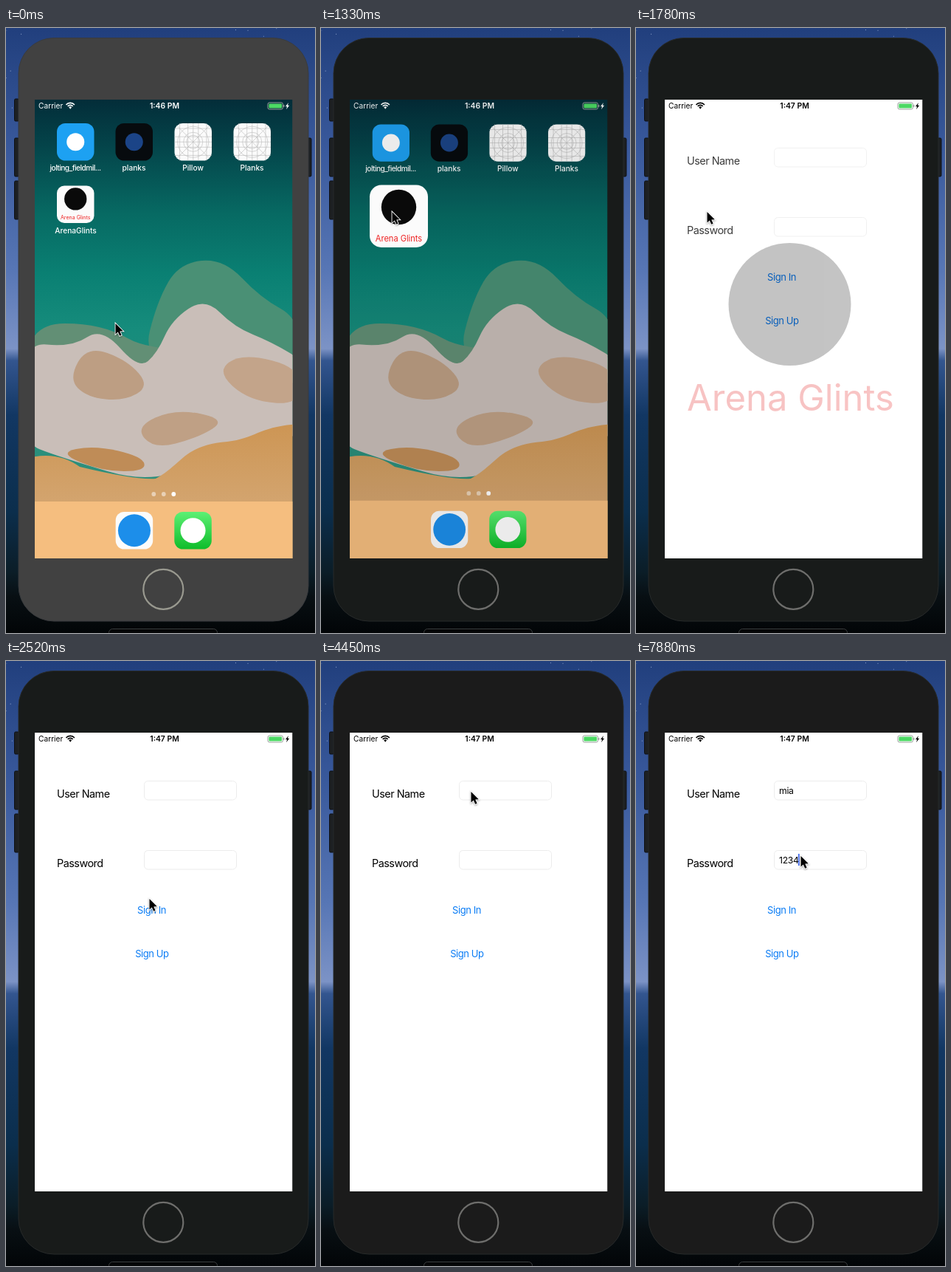
Animation, 419 px wide and 819 px high, one loop 8 s. Source, as an HTML page:

```html
<!DOCTYPE html>
<html lang="en">
<head>
<meta charset="utf-8">
<title>App launch and sign in</title>
<style>
html, body { margin: 0; width: 100%; height: 100%; overflow: hidden; background: #06101c; }
svg { display: block; width: 419px; height: 819px; font-family: Inter, "Open Sans", sans-serif; }
text { white-space: pre; }
#pointer { filter: drop-shadow(0 1px 1px rgba(0,0,0,.35)); }
</style>
</head>
<body>
<svg id="stage" viewBox="0 0 419 819"></svg>
<script>
const LOOP = 8000;
const TILE = 50.5;
const BLUE = '#0a7cf5';

// [time, x, y] of the pointer tip; each position is held until the next
const POINTER = [
  [0, 148, 400], [440, 128, 300], [590, 100, 197], [740, 92, 228], [890, 96, 249],
  [2220, 110, 256], [2370, 160, 290], [2520, 194, 322], [2670, 200, 338], [2810, 202, 354],
  [2960, 201, 378], [3110, 199, 396], [3250, 199, 402],
  [4000, 200, 370], [4150, 203, 290], [4300, 203, 205], [4450, 203, 177],
  [6090, 206, 190], [6240, 216, 224], [6390, 222, 254], [6530, 223, 262], [6680, 223, 264]
];
const USER_TEXT = [[0, ''], [5790, 'mia']];
const PASS_TEXT = [[0, ''], [7280, '12'], [7580, '123'], [7880, '1234']];
const USER_CARET = [[0, 0], [4750, 1], [5340, 0.45], [5490, 0], [5790, 1], [6680, 0]];
const PASS_CARET = [[0, 0], [6680, 1]];
const BODY = [[0, '#414141'], [1330, '#181b1a'], [2670, '#1b1b1b']];
const EDGE = [[0, '#393b3e'], [1330, '#272a2a']];
const RING = [[0, '#99998f'], [1330, '#6e6e6c']];
const HOME_SCALE = [[0, 1], [1330, 0.995], [1480, 0.95]];
const HOME_DIM = [[0, 0], [1330, 0.08], [1480, 0.59]];
const SPLASH = [[0, 0], [1630, 1], [1780, 0.23], [1920, 0]];

function held(keys, t) {
  let found = keys[0];
  for (const key of keys) if (key[0] <= t) found = key;
  return found;
}
const valueAt = (keys, t) => held(keys, t)[1];

// Markup helpers
const rect = (x, y, w, h, r, fill, extra = '') =>
  `<rect x="${x}" y="${y}" width="${w}" height="${h}" rx="${r}" fill="${fill}" ${extra}/>`;
const disc = (x, y, r, fill, extra = '') => `<circle cx="${x}" cy="${y}" r="${r}" fill="${fill}" ${extra}/>`;
const path = (d, fill, extra = '') => `<path d="${d}" fill="${fill}" ${extra}/>`;
const group = (id, body, extra = '') => `<g id="${id}" ${extra}>${body}</g>`;
const screenFill = (fill, extra) => rect(39, 97, 349.5, 621, 0, fill, extra);

function label(str, x, y, size, fill, { weight = 400, anchor = 'start', gap = 0 } = {}) {
  return `<text x="${x}" y="${y}" font-size="${size}" fill="${fill}" font-weight="${weight}" ` +
    `text-anchor="${anchor}" letter-spacing="${gap}">${str}</text>`;
}

function gradient(id, y1, y2, stops) {
  return `<linearGradient id="${id}" gradientUnits="userSpaceOnUse" x1="0" x2="0" y1="${y1}" y2="${y2}">` +
    stops.map(([at, color]) => `<stop offset="${at}" stop-color="${color}"/>`).join('') + '</linearGradient>';
}

// Closed soft outline through the midpoints of the given points
function blob(points, fill) {
  const mid = (a, b) => [(a[0] + b[0]) / 2, (a[1] + b[1]) / 2];
  const curves = points.map((p, i) => `Q${p} ${mid(p, points[(i + 1) % points.length])}`);
  return path(`M${mid(points[points.length - 1], points[0])}${curves.join('')}Z`, fill);
}

const defs = '<defs>' +
  gradient('sky', 0, 819, [
    [0, '#213f7d'], [0.2, '#39599c'], [0.4, '#5776b5'], [0.53, '#7c93c6'], [0.55, '#33558f'],
    [0.64, '#123763'], [0.8, '#0b2e4c'], [0.9, '#0b1d27'], [0.94, '#080f13'], [1, '#020507']
  ]) +
  gradient('sea', 97, 718, [
    [0, '#032d39'], [0.1, '#04444a'], [0.25, '#076a63'], [0.38, '#0a8073'], [0.5, '#168c7c'], [1, '#3c917b']
  ]) +
  gradient('sand', 540, 640, [[0, '#cd9655'], [1, '#d3a46e']]) +
  gradient('green', 655, 705, [[0, '#5df074'], [1, '#0fbd2b']]) +
  `<clipPath id="screenClip">${screenFill('#000')}</clipPath>` +
  `<clipPath id="windowClip">${rect(45, 138.5, 290, 471.5, 12, '#000')}</clipPath></defs>`;

function desktop() {
  let seed = 11, stars = '';
  const random = () => (seed = (seed * 16807) % 2147483647) / 2147483647;
  for (let i = 0; i < 70; i++)
    stars += rect(random() * 419, random() * 150, 1, 1, 0, '#dce6ff', `opacity="${0.2 + random() * 0.5}"`);
  return rect(0, 0, 419, 819, 0, 'url(#sky)') + stars +
    rect(139.5, 813.5, 147, 20, 5, '#050607', 'stroke="#3a3d3e"');
}

function phone() {
  const buttons = [[11.5, 96, 30], [11.5, 149, 52], [11.5, 207, 52], [408, 149, 52]];
  return buttons.map(([x, y, h]) => rect(x, y, 6, h, 1.5, '#1d2023', 'stroke="#0c0e12"')).join('') +
    rect(17, 13.5, 393, 789.5, 48, '#414141', 'id="body"') +
    disc(213.3, 759.8, 27, 'none', 'id="ring" stroke-width="2.2"');
}

function beach() {
  return screenFill('url(#sea)') +
    blob([[185, 450], [205, 370], [235, 318], [295, 312], [345, 365], [400, 395], [400, 480], [280, 480]], '#4a9075') +
    blob([[30, 400], [130, 400], [200, 440], [400, 430], [400, 500], [30, 500]], '#628f75') +
    // foam, then the gaps in it
    blob([[20, 560], [20, 425], [90, 432], [130, 405], [180, 462], [205, 440], [225, 395], [270, 365],
      [310, 405], [360, 425], [410, 455], [410, 560], [300, 560], [205, 620], [70, 580]], '#c9beb8') +
    blob([[85, 475], [110, 430], [165, 450], [195, 485], [160, 505], [110, 500]], '#bd9e83') +
    blob([[285, 465], [320, 440], [400, 460], [400, 510], [330, 505]], '#c3a48a') +
    blob([[70, 575], [120, 565], [185, 580], [190, 600], [130, 600]], '#bf8c57') +
    blob([[175, 540], [230, 515], [300, 530], [260, 555], [200, 570]], '#bfa085') +
    path('M30 582Q70 572 100 594Q175 612 203 610C240 590 240 565 300 560C340 555 345 538 400 536V730H30Z', 'url(#sand)');
}

function templateTile(x, y) {
  const c = TILE / 2;
  const lines = [0.14, 0.36, 0.5, 0.64, 0.86].map(k =>
    `M${x + k * TILE} ${y}v${TILE}M${x} ${y + k * TILE}h${TILE}`).join('');
  const diagonals = `M${x + 3} ${y + 3}l44.5 44.5M${x + 47.5} ${y + 3}l-44.5 44.5`;
  return rect(x, y, TILE, TILE, 11.5, '#fbfbfb') +
    `<g stroke="#b9b9b9" stroke-width=".6">${path(lines + diagonals, 'none')}` +
    [9, 13, 21].map(r => disc(x + c, y + c, r, 'none')).join('') + '</g>';
}

function appTile(x, y, w, h) {
  return rect(x, y, w, h, w * 0.2, '#fbfbfb') +
    disc(x + w / 2, y + h * 0.355, w * 0.3, '#0a0a0a') +
    label('Arena Glints', x + w / 2, y + h * 0.91, w * 0.14, '#e22', { anchor: 'middle' });
}

const tile = (x, y, fill, dot, r) =>
  rect(x, y, TILE, TILE, 11.5, fill) + disc(x + TILE / 2, y + TILE / 2, r, dot);

function homeIcons() {
  const name = (str, x, y, gap = 0) => label(str, x, y, 10.2, '#fff', { anchor: 'middle', weight: 500, gap });
  return rect(-20, 641, 459, 160, 0, '#f5be7f') +
    tile(69, 129, '#1da1f2', '#fff', 12) + tile(148.5, 129, '#070b0e', '#1b4487', 12) +
    templateTile(228.5, 129) + templateTile(308.5, 129) +
    name('jolting_fieldmil...', 94, 193, -0.55) + name('planks', 173.5, 193) +
    name('Pillow', 253.5, 193) + name('Planks', 333.5, 193) +
    group('smallApp', appTile(69, 213.5, TILE, TILE) + name('ArenaGlints', 94.5, 277.5)) +
    [200.3, 213.8, 227.3].map((x, i) => disc(x, 631, 2.9, '#fff', `opacity="${i < 2 ? 0.5 : 1}"`)).join('') +
    tile(148.7, 655, '#fbfbfb', '#1c8eea', 22) + tile(228.3, 655, 'url(#green)', '#fff', 17);
}

function status(color, clock) {
  const arc = r => {
    const dx = r * 0.75, dy = r * 0.66;
    return `M${87.2 - dx} ${109 - dy}A${r} ${r} 0 0 1 ${87.2 + dx} ${109 - dy}`;
  };
  return label('Carrier', 44, 109.3, 10.2, color) +
    label(clock, 215, 109.3, 10.4, color, { weight: 600, anchor: 'middle' }) +
    path(arc(4.6) + arc(7.6), 'none', `stroke="${color}" stroke-width="1.7"`) +
    path(arc(2.6) + 'L87.2 109.8Z', color) +
    rect(355, 101, 20.5, 9, 2.2, 'none', 'stroke="#9aa09c"') +
    rect(356.4, 102.4, 17.7, 6.2, 1, '#4cd964') + rect(376.3, 104, 1.2, 3, 0, '#9aa09c') +
    path('M383 101L379 106.3H381.2L380 110.3L384.2 104.7H381.9Z', color);
}

const splash = () => screenFill('#fff') + disc(208.5, 374, 83, '#000') +
  label('Arena Glints', 209.5, 518, 49, '#e10000', { anchor: 'middle' });

function field(id, y) {
  return group(id, rect(187.5, y, 125, 25.5, 5, '#fff', 'stroke="#ececec"') +
    label('', 194, y + 17, 12.2, '#000', { gap: -0.3 }) +
    rect(193.3, y + 4.5, 1.8, 16, 0, '#426bf2', 'class="caret"'));
}

function login() {
  const link = { anchor: 'middle', gap: -0.45 };
  return screenFill('#fff') +
    label('User Name', 69, 185, 14.4, '#000', { gap: -0.5 }) +
    label('Password', 69, 278.5, 14.4, '#000', { gap: -0.5 }) +
    field('user', 162.5) + field('pass', 256.5) +
    label('Sign In', 197.5, 342.3, 13, BLUE, link) +
    label('Sign Up', 197.8, 400.5, 13, BLUE, link);
}

const stage = document.getElementById('stage');
stage.innerHTML = defs + desktop() + phone() +
  group('screen',
    group('login', login()) +
    group('home', beach() + group('icons', homeIcons()) + status('#fff', '1:46 PM') +
      screenFill('#000', 'id="dim"')) +
    group('bigApp', appTile(66, 212.5, 79, 84.5)) +
    group('window', '<g transform="translate(45 138.5) scale(.83) translate(-39 -97)">' +
      splash() + status('#000', '1:46 PM') + '</g>', 'clip-path="url(#windowClip)"') +
    group('splash', splash()) +
    group('earlyBar', status('#000', '1:46 PM')) +
    group('lateBar', status('#000', '1:47 PM')),
    'clip-path="url(#screenClip)"') +
  path('M.5 0v14.5l3.3-3.1 2.4 5.4 2.4-1.1-2.3-5.3 4.5-.1Z', '#000',
    'id="pointer" stroke="#fff" stroke-width="1.8" paint-order="stroke"');

const find = id => document.getElementById(id);
const set = (id, name, value) => find(id).setAttribute(name, value);
const show = (id, on) => set(id, 'display', on ? 'inline' : 'none');

function updateField(id, str, caret) {
  const entry = find(id).querySelector('text');
  const bar = find(id).querySelector('.caret');
  if (entry.textContent !== str) entry.textContent = str;
  bar.setAttribute('x', 193.3 + (str ? entry.getComputedTextLength() : 0));
  bar.setAttribute('opacity', caret);
}

function frame() {
  const t = performance.now() % LOOP;
  const [, x, y] = held(POINTER, t);
  const scale = valueAt(HOME_SCALE, t);
  set('pointer', 'transform', `translate(${x} ${y})`);
  set('body', 'fill', valueAt(BODY, t));
  set('body', 'stroke', valueAt(EDGE, t));
  set('ring', 'stroke', valueAt(RING, t));
  set('icons', 'transform', `translate(213.75 407.5) scale(${scale}) translate(-213.75 -407.5)`);
  set('dim', 'opacity', valueAt(HOME_DIM, t));
  set('splash', 'opacity', valueAt(SPLASH, t));
  show('home', t < 1630);
  show('smallApp', t < 1330);
  show('bigApp', t >= 1330 && t < 1480);
  show('window', t >= 1480 && t < 1630);
  show('earlyBar', t >= 1630 && t < 1780);
  show('lateBar', t >= 1780);
  show('login', t >= 1630);
  updateField('user', valueAt(USER_TEXT, t), valueAt(USER_CARET, t));
  updateField('pass', valueAt(PASS_TEXT, t), valueAt(PASS_CARET, t));
  requestAnimationFrame(frame);
}
frame();
</script>
</body>
</html>
```
